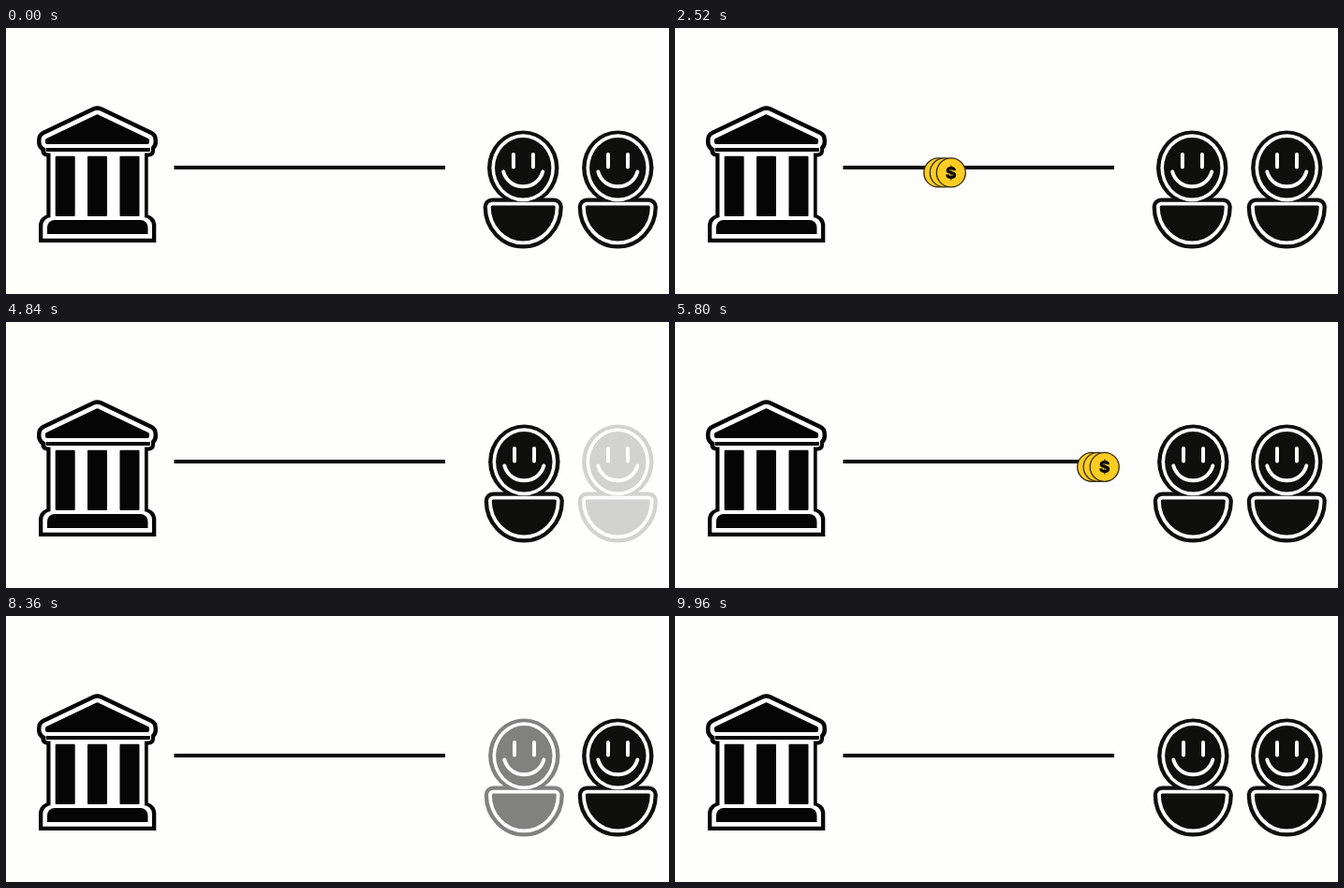
An HTML page with a canvas for the animation above (10 s loop, 708 by 284 pixels).

```html
<!DOCTYPE html>
<html lang="en">
<head>
<meta charset="utf-8">
<title>Lending loop</title>
<style>
  html, body { margin: 0; width: 100%; height: 100%; overflow: hidden; background: #fefefd; }
  canvas { display: block; }
</style>
</head>
<body>
<canvas id="stage" width="708" height="284"></canvas>
<script>
const ctx = document.getElementById('stage').getContext('2d');
const LOOP = 10000;
const PAPER = [254, 254, 253];
const INK = [15, 15, 14];
const BLACK = '#050505';
const WHITE = `rgb(${PAPER})`;

const lerp = (a, b, p) => a + (b - a) * p;
const progress = (t, from, to) => Math.min(1, Math.max(0, (t - from) / (to - from)));
const inkAt = alpha => `rgb(${PAPER.map((c, i) => Math.round(lerp(c, INK[i], alpha)))})`;

// Fills a path grown outwards by a rounded margin.
function grow(path, margin, color) {
  ctx.fillStyle = ctx.strokeStyle = color;
  ctx.lineJoin = 'round';
  ctx.fill(path);
  if (margin > 0) {
    ctx.lineWidth = margin * 2;
    ctx.stroke(path);
  }
}

function box(x1, y1, x2, y2, radii = 0) {
  const path = new Path2D();
  path.roundRect(x1, y1, x2 - x1, y2 - y1, radii);
  return path;
}

const roof = new Path2D('M97.5 94.2 L44 119.7 V122 H151 V119.7 Z');
const bowl = new Path2D('M-33 191 H33 A33 35 0 0 1 -33 191 Z');

function drawBank() {
  grow(roof, 11, BLACK);
  grow(box(37.5, 120, 159, 137.5, 6), 0, BLACK);
  grow(box(43.3, 130, 151.7, 215), 0, BLACK);
  grow(box(35, 199, 160.3, 229, [12, 12, 0, 0]), 0, BLACK);

  grow(roof, 6.5, WHITE);
  grow(box(42, 122, 155, 133.5, 3), 0, WHITE);
  grow(box(47.5, 130, 148, 215), 0, WHITE);
  grow(box(39.3, 202, 156, 224.7, [9, 9, 0, 0]), 0, WHITE);

  grow(roof, 2, BLACK);
  grow(box(42.5, 128, 154, 132, 1), 0, BLACK);
  for (const x of [52.7, 87, 121.5]) grow(box(x, 136.8, x + 21, 201, 1), 0, BLACK);
  grow(box(44, 205, 151.5, 220, [8, 8, 0, 0]), 0, BLACK);
}

function disc(rx, ry, color) {
  ctx.fillStyle = color;
  ctx.beginPath();
  ctx.ellipse(0, 149.3, rx, ry, 0, 0, Math.PI * 2);
  ctx.fill();
}

function drawPerson(x, alpha = 1) {
  if (alpha <= 0) return;
  const ink = inkAt(alpha);
  ctx.save();
  ctx.translate(x, 0);
  disc(38.2, 39.7, ink);
  grow(bowl, 9.6, ink);
  disc(33.8, 36, WHITE);
  grow(bowl, 5.3, WHITE);
  disc(30.2, 32.3, ink);
  grow(bowl, 1.5, ink);

  ctx.strokeStyle = WHITE;
  ctx.lineWidth = 4;
  ctx.lineCap = 'round';
  ctx.beginPath();
  for (const eye of [-10.3, 10.7]) {
    ctx.moveTo(eye, 135);
    ctx.lineTo(eye, 148.5);
  }
  ctx.moveTo(-21, 153.5);
  ctx.bezierCurveTo(-15, 174.5, 15, 174.5, 21, 153.5);
  ctx.stroke();
  ctx.restore();
}

function drawCoins({ x, y, scale, alpha }) {
  if (alpha <= 0) return;
  ctx.save();
  ctx.globalAlpha = alpha;
  ctx.translate(x, y);
  ctx.scale(scale, scale);
  ctx.fillStyle = '#fccc22';
  ctx.strokeStyle = '#33290c';
  ctx.lineWidth = 1.3;
  for (const dx of [-7, -0.5, 6.5]) {
    ctx.beginPath();
    ctx.arc(dx, 0, 15.5, 0, Math.PI * 2);
    ctx.fill();
    ctx.stroke();
  }
  ctx.fillStyle = '#0c0a04';
  ctx.font = '900 18px Inter, Arial, sans-serif';
  ctx.textAlign = 'center';
  ctx.fillText('$', 6.5, 6.5);
  ctx.restore();
}

const AT_BANK = { x: 137, y: 154.1, scale: 1 };
const LINE_END = { x: 452.2, y: 154.8, scale: 1 };
const AT_PERSON = { x: 501.5, y: 159, scale: 0.76 };

function between(a, b, p, alpha) {
  return { x: lerp(a.x, b.x, p), y: lerp(a.y, b.y, p), scale: lerp(a.scale, b.scale, p), alpha };
}

function coinsAt(t) {
  if (t < 3040) return between(AT_BANK, LINE_END, progress(t, 2040, 3040), progress(t, 1960, 2160));
  if (t < 5000) return between(LINE_END, AT_PERSON, progress(t, 3040, 3560), 1 - progress(t, 3560, 3720));
  if (t < 6000) return between(AT_PERSON, LINE_END, progress(t, 5200, 5740), progress(t, 5000, 5200));
  return between(LINE_END, AT_BANK, progress(t, 6000, 7000), 1 - progress(t, 7780, 8000));
}

const FRONT = 552.2, NEXT = 553.3, BACK = 653.3;

function drawQueue(t) {
  if (t < 3960) {
    drawPerson(FRONT);
    drawPerson(BACK);
  } else if (t < 8260) {
    drawPerson(FRONT, 1 - progress(t, 3960, 4160));
    drawPerson(BACK, progress(t, 4803, 5003));
    drawPerson(lerp(BACK, NEXT, progress(t, 3980, 4780)));
  } else {
    drawPerson(NEXT, 1 - progress(t, 8260, 8470));
    drawPerson(BACK, progress(t, 9740, 9940));
    drawPerson(lerp(BACK, NEXT, progress(t, 8900, 9700)));
  }
}

function draw(now) {
  const t = now % LOOP;
  ctx.fillStyle = WHITE;
  ctx.fillRect(0, 0, 708, 284);
  drawBank();
  grow(box(179.5, 147, 469, 151), 0, BLACK);
  drawQueue(t);
  drawCoins(coinsAt(t));
}

let start = null;
function tick(now) {
  if (start === null) start = now;
  draw(Math.max(0, now - start));
  requestAnimationFrame(tick);
}
draw(0);
requestAnimationFrame(tick);
</script>
</body>
</html>
```
